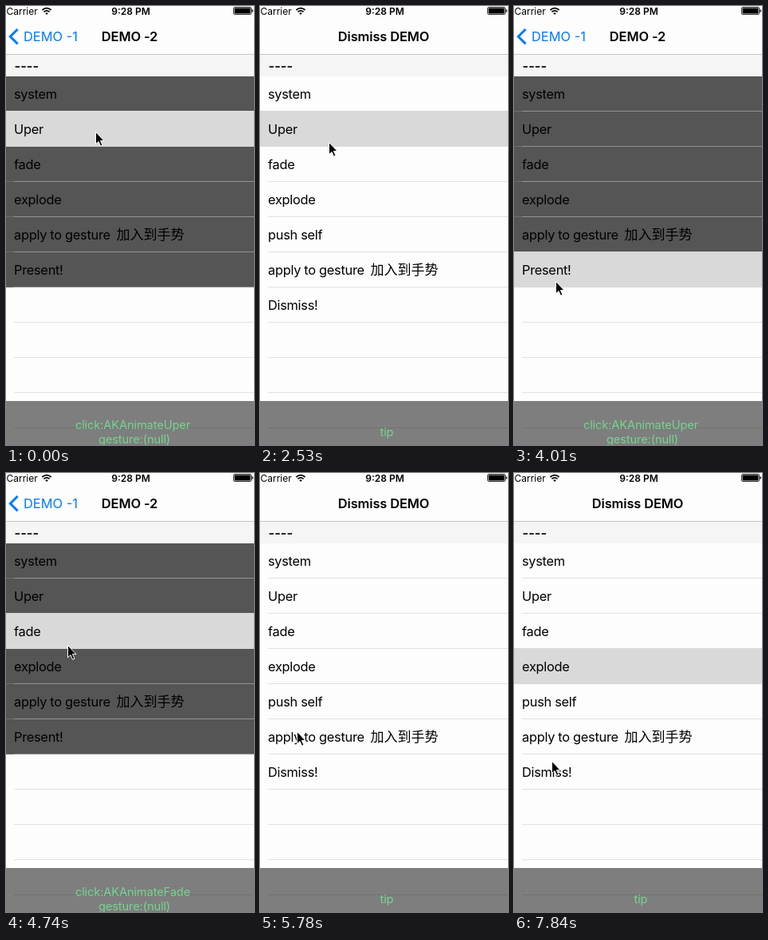
Recreate the animation shown at these times as an HTML page. Size 311x549 px, loop 8 s.

```html
<!DOCTYPE html>
<html lang="en">
<head>
<meta charset="utf-8">
<title>Transition demo</title>
<style>
  html, body { margin: 0; width: 100%; height: 100%; overflow: hidden; background: #fdfdfd; }
  svg { display: block; width: 311px; height: 549px; }
  text { font-family: Inter, "Noto Sans", sans-serif; font-size: 16.4px; white-space: pre; }
  .row { letter-spacing: -.3px; }
  .cjk { font-family: "Noto Sans CJK SC", "Noto Sans CJK", sans-serif; font-size: 17px; letter-spacing: 0; }
  .title { font-weight: 600; letter-spacing: -.1px; text-anchor: middle; }
  .head { font-weight: 700; fill: #222; }
  .tip { font-size: 14.6px; fill: #74d68f; text-anchor: middle; letter-spacing: -.1px; }
  .status { font-size: 12px; }
</style>
</head>
<body>
<svg id="stage" viewBox="0 0 311 549"></svg>
<script>
const LOOP = 8000, STEP = 148, ROW = 44, TOP = 88;
// The phone screen is slightly larger than the visible stage.
const SCREEN = { x: -5, y: -4, w: 320, h: 568 };

const rect = (x, y, w, h, fill, more = '') =>
  `<rect x="${x}" y="${y}" width="${w}" height="${h}" fill="${fill}" ${more}/>`;
const text = (x, y, cls, str, more = '') =>
  `<text x="${x}" y="${y}" class="${cls}" ${more}>${str}</text>`;
const band = (y, h, fill, more) => rect(SCREEN.x, y, SCREEN.w, h, fill, more);

function rowLabel(str, i) {
  const y = TOP + i * ROW + 28;
  const [latin, cjk] = str.split('|');
  return text(10, y, 'row', latin) + (cjk ? text(138.5, y, 'cjk', cjk) : '');
}

function separators(darkRows) {
  let out = '';
  for (let i = 0; i < 11; i++) {
    const y = TOP + (i + 1) * ROW - 1;
    const dark = i < darkRows;
    if (dark) out += rect(SCREEN.x, y, 15, 1, '#6e6e6e');
    out += rect(10, y, 305, 1, dark ? '#939393' : '#e1e1e3');
  }
  return out;
}

function page(id, title, rows, darkRows, extra) {
  return `<g id="${id}">` +
    band(SCREEN.y, SCREEN.h, '#fdfdfd') +
    band(60, 1, '#c6c6c6') + band(61, 27, '#f5f5f5') +
    text(155, 44, 'title', title) + text(10.5, 81, 'head', '----') +
    (darkRows ? band(TOP, darkRows * ROW, '#555') : '') +
    separators(darkRows) +
    band(0, ROW + 1, '#d9d9d9', `id="${id}-sel"`) +
    rows.map(rowLabel).join('') +
    band(494, 70, '#000', 'fill-opacity=".5"') +
    extra + '</g>';
}

const gesture = 'apply to gesture |加入到手势';
const common = ['system', 'Uper', 'fade', 'explode'];

const backButton =
  '<path d="M14.6 29 5.4 38.2 14.6 47.4" fill="none" stroke="#007aff" stroke-width="3"/>' +
  text(22, 44, '', 'DEMO -1', 'fill="#007aff"');

const statusBar =
  text(.5, 10.5, 'status', 'Carrier') +
  '<g fill="none" stroke="#000" stroke-width="1.7">' +
  '<path d="M45.4 5Q51 .2 56.6 5M47.4 7.4Q51 4.2 54.6 7.4"/></g>' +
  '<path d="M49.2 9.1Q51 7.6 52.8 9.1L51 11Z"/>' +
  text(156.5, 10.5, 'status', '9:28 PM', 'font-weight="600" text-anchor="middle"') +
  rect(285.5, 1.5, 22, 9, 'none', 'rx="1.5" stroke="#000" stroke-width=".8"') +
  rect(286.6, 2.6, 19.8, 6.8, '#000', 'rx=".6"') +
  rect(308.4, 4.3, 1.4, 3.4, '#000', 'rx=".7"');

const $ = id => document.getElementById(id);

$('stage').innerHTML =
  page('home', 'DEMO -2', [...common, gesture, 'Present!'], 6,
    backButton + text(159, 529, 'tip', '', 'id="clicked"') +
    text(161, 547, 'tip', 'gesture:(null)')) +
  page('modal', 'Dismiss DEMO', [...common, 'push self', gesture, 'Dismiss!'], 0,
    text(159, 538, 'tip', 'tip')) +
  statusBar +
  '<path id="cursor" d="M.5 .5V15.8L4 12.5 6.6 18.3 9 17.2 6.4 11.6H11Z" ' +
  'fill="#000" stroke="#fff" stroke-width="1"/>';

// Selected row from a given step on; -1 means none.
const homeSel = [[0, 1], [5, 5], [32, 2], [37, 5]];
const modalSel = [[0, -1], [17, 1], [24, 6], [30, -1], [49, 3]];

// Pointer path: step, x, y.
const path = [
  [1, 112, 157], [3, 63, 330], [10, 63, 330], [13, 86, 170], [17, 86, 170],
  [22, 48, 366], [26, 48, 366], [30, 77, 215], [32, 77, 215], [35, 46, 323],
  [39, 46, 323], [44, 90, 208], [45, 80, 241], [49, 80, 241], [53, 47, 360]
];

const ease = u => (1 - Math.cos(Math.PI * Math.min(1, Math.max(0, u)))) / 2;
const lastOf = (table, n) => table.filter(([from]) => from <= n).pop()[1];

function pointer(n) {
  const i = path.findIndex(p => p[0] >= n);
  if (i === 0) return path[0].slice(1);
  const [a, b] = [path[i - 1], path[i]];
  const u = ease((n - a[0]) / (b[0] - a[0]));
  return [1, 2].map(k => a[k] + (b[k] - a[k]) * u);
}

// How far the modal is pushed to the lower right corner, and its opacity.
function modalPose(t) {
  if (t < 3400) {
    const p = ease((t - 844) / 338);
    return { away: 1 - p, alpha: p };
  }
  if (t < 5000) return { away: ease((t - 3492) / 338), alpha: 1 };
  return { away: 0, alpha: ease((t - 5524) / 200) };
}

function select(id, row) {
  const el = $(id + '-sel');
  el.setAttribute('visibility', row < 0 ? 'hidden' : 'inherit');
  el.setAttribute('y', TOP + row * ROW - 1);
}

function draw(now) {
  const n = Math.min(53, Math.floor((now % LOOP + 4) / STEP));
  const { away, alpha } = modalPose(n * STEP);
  const modal = $('modal');
  modal.setAttribute('transform',
    `translate(${Math.round(away * SCREEN.w)} ${Math.round(away * SCREEN.h)})`);
  modal.setAttribute('opacity', alpha);
  modal.setAttribute('visibility', alpha > 0 && away < 1 ? 'visible' : 'hidden');
  select('home', lastOf(homeSel, n));
  select('modal', lastOf(modalSel, n));
  $('clicked').textContent = 'click:AKAnimate' + (n < 32 ? 'Uper' : 'Fade');
  $('cursor').setAttribute('transform', `translate(${pointer(n).map(Math.round).join(' ')})`);
}

const start = performance.now();
function tick() {
  draw(performance.now() - start);
  requestAnimationFrame(tick);
}
tick();
</script>
</body>
</html>
```
